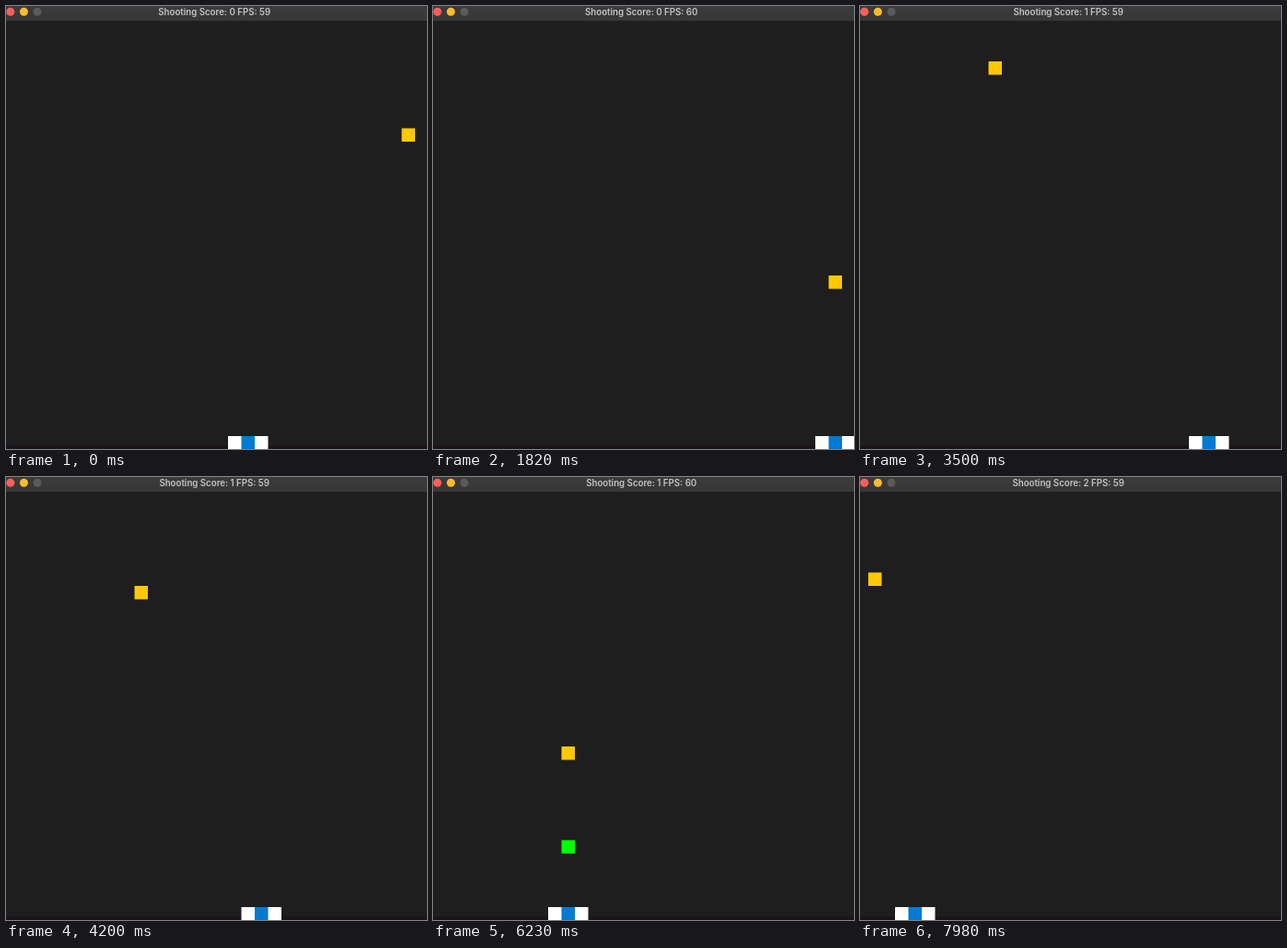
Animation, 457 px wide and 480 px high, one loop 8000 ms. Source, as an HTML page:

```html
<!DOCTYPE html>
<html lang="en">
<head>
<meta charset="utf-8">
<title>Shooting</title>
<style>
  html, body { margin: 0; width: 100%; height: 100%; overflow: hidden; background: #1e1e1e; }
  svg { display: block; width: 457px; height: 480px; }
  text { font: 600 9.7px Inter, "Open Sans", sans-serif; fill: #c4c4c4; text-anchor: middle; }
</style>
</head>
<body>
<svg viewBox="0 0 457 480">
  <defs>
    <linearGradient id="bar" x2="0" y2="1">
      <stop offset="0" stop-color="#3b3b3b"/>
      <stop offset="1" stop-color="#373737"/>
    </linearGradient>
  </defs>
  <rect width="457" height="480" fill="#1e1e1e"/>
  <rect y="476.5" width="457" height="3.5" fill="#1c1217"/>
  <rect width="457" height="16" fill="url(#bar)"/>
  <circle cx="4.8" cy="6.3" r="4.5" fill="#ff5f57"/>
  <circle cx="19.4" cy="6.3" r="4.5" fill="#febc2e"/>
  <circle cx="34" cy="6.3" r="4.5" fill="#5a5a5a"/>
  <text id="title" x="226.2" y="9.6"></text>
  <rect id="enemy" width="14.5" height="14.5" fill="#ffc800"/>
  <rect id="bullet" width="14.5" height="14.5" fill="#00ff00"/>
  <g id="ship">
    <rect x="-14.5" width="43.5" height="14.5" fill="#fff"/>
    <rect width="14.5" height="14.5" fill="#007ad2"/>
  </g>
</svg>
<script>
const LOOP = 8000, FRAME = 70, TICK = 175, STEP = 105, CELL = 14.5;
const $ = id => document.getElementById(id);
const [title, enemy, bullet, ship] = ['title', 'enemy', 'bullet', 'ship'].map($);

// Falling blocks and rising shots: start, end, column, first row
const enemies = [
  { from: -120, to: 2810, col: 30, row: 8 },
  { from: 2810, to: 6775, col: 10, row: 0 },
  { from: 6775, to: LOOP, col: 1, row: 0 }
];
const bullets = [
  { from: 1925, to: 2810, col: 30, row: 29 },
  { from: 5550, to: 6775, col: 10, row: 29 }
];
// Ship runs: start, direction, number of cells
const runs = [
  [105, 1, 8], [1225, 1, 4], [2080, -1, 2], [3010, -1, 1],
  [3425, -1, 17], [7110, -1, 1], [7560, -1, 5]
];
// Window title: start, score, frame rate
const labels = [
  [0, 0, 59], [1120, 0, 60], [2170, 0, 59],
  [3220, 1, 59], [5320, 1, 60], [7420, 2, 59]
];

function place(el, col, row) {
  el.setAttribute('transform', `translate(${col * CELL - 5.5} ${row * CELL + 16.5})`);
}

function placeMover(el, list, t, dir) {
  const m = list.find(m => t >= m.from && t < m.to);
  el.setAttribute('visibility', m ? 'visible' : 'hidden');
  if (m) place(el, m.col, m.row + dir * Math.floor((t - m.from) / TICK));
}

function shipCol(t) {
  return runs.reduce((col, [start, dir, count]) => {
    const steps = Math.floor((t - start) / STEP) + 1;
    return col + dir * Math.max(0, Math.min(count, steps));
  }, 18);
}

function draw(now) {
  const t = Math.floor((now % LOOP) / FRAME) * FRAME;
  const [, score, fps] = labels.filter(l => l[0] <= t).pop();
  const text = `Shooting Score: ${score} FPS: ${fps}`;
  if (title.textContent !== text) title.textContent = text;
  placeMover(enemy, enemies, t, 1);
  placeMover(bullet, bullets, t, -1);
  place(ship, shipCol(t), 31);
}

let begin;
function loop(now) {
  begin ??= now;
  draw(now - begin);
  requestAnimationFrame(loop);
}
draw(0);
requestAnimationFrame(loop);
</script>
</body>
</html>
```
